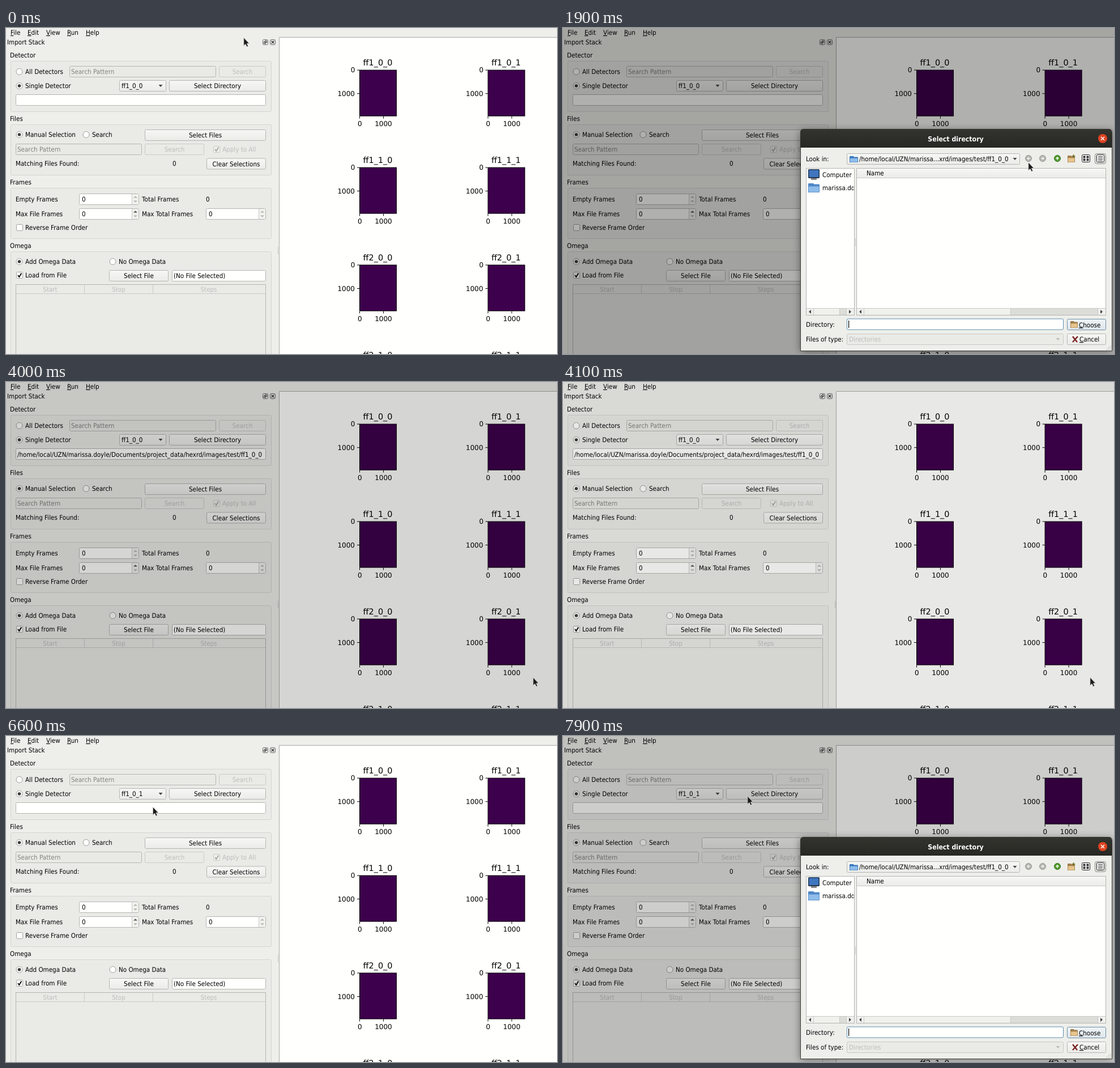
These frames come from a looping animation (973 px wide and 575 px high, 8000 ms). An HTML page:

```html
<!DOCTYPE html>
<html lang="en">
<head>
<meta charset="utf-8">
<title>Import Stack</title>
<style>
html, body { margin: 0; width: 100%; height: 100%; overflow: hidden; background: #eeefeb; }
svg { display: block; }
text { font: 11.55px "DejaVu Sans", sans-serif; text-rendering: geometricPrecision; white-space: pre; }
.mid { text-anchor: middle; }
.off { fill: #bdbebb; }
.hint { fill: #82837f; }
.bold { font-size: 12.2px; font-weight: bold; fill: #fff; }
.tick { font-size: 12px; }
.title { font-size: 14.4px; }
.end { text-anchor: end; }
.shadow { filter: blur(7px); opacity: .45; }
</style>
</head>
<body>
<svg id="stage" width="973" height="575" viewBox="0 0 973 575"></svg>
<script>
const LINE = '#b5b6b2', PALE = '#c9cac6', PAPER = '#fffffd';

// Interface text uses the 90 % wide condensed cut.
const text = (x, y, s, cls = '', more = '') =>
  `<text transform="translate(${x} ${y})scale(.9 1)" class="${cls}" ${more}>${s}</text>`;
const plotText = (x, y, s, cls) => `<text x="${x}" y="${y}" class="${cls}">${s}</text>`;
const box = (x, y, w, h, fill, stroke = LINE, r = 1.5, more = '') =>
  `<rect x="${x + .5}" y="${y + .5}" width="${w - 1}" height="${h - 1}" rx="${r}" fill="${fill}" stroke="${stroke}" ${more}/>`;
const fill = (x, y, w, h, c, more = '') =>
  `<rect x="${x}" y="${y}" width="${w}" height="${h}" fill="${c}" ${more}/>`;
const path = (d, stroke, w = 1, f = 'none') =>
  `<path d="${d}" fill="${f}" stroke="${stroke}" stroke-width="${w}"/>`;
const disc = (x, y, r, f, s = 'none') => `<circle cx="${x}" cy="${y}" r="${r}" fill="${f}" stroke="${s}"/>`;
const key = s => `<tspan text-decoration="underline">${s[0]}</tspan>${s.slice(1)}`;
const arrow = (x, y, dx, dy, c = '#444') => dy
  ? path(`M${x - 3.5} ${y - dy * 2}h7l-3.5 ${dy * 4}z`, 'none', 0, c)
  : path(`M${x - dx * 2} ${y - 3.5}v7l${dx * 4} -3.5z`, 'none', 0, c);

const button = (x, y, w, s, on = true, id = '') =>
  box(x, y, w, 20, on ? 'url(#face)' : '#eaebe7', on ? LINE : PALE, 2, id && `id="${id}"`) +
  text(x + w / 2, y + 14, s, on ? 'mid' : 'mid off');
const field = (x, y, w, s = '', on = true) =>
  box(x, y, w, 20, on ? PAPER : '#e9eae6', LINE, 2) + text(x + 3, y + 14, s, on ? '' : 'hint');
const radio = (x, y, s, on) =>
  disc(x + .5, y, 5.5, PAPER, '#9b9c98') + (on ? disc(x + .5, y, 2.8, '#3c3c3a') : '') + text(x + 11, y + 4, s);
const check = (x, y, s, on, live = true) =>
  box(x, y, 12, 12, live ? PAPER : '#eeefeb', live ? '#a5a6a2' : PALE, 1) +
  (on ? path(`M${x + 3} ${y + 6}l2.3 3 4 -6.5`, live ? '#111' : '#aaaba7', 2) : '') +
  text(x + 16, y + 10, s, live ? '' : 'off');
const spin = (x, y, up) =>
  field(x, y, 106) + text(x + 5, y + 14, '0') +
  fill(x + 93, y + 1, 12, 18, '#f1f2ee') + path(`M${x + 93.5} ${y + 1}v18`, PALE) +
  arrow(x + 99.5, y + 6, 0, -.8, up ? '#444' : '#b0b1ad') + arrow(x + 99.5, y + 14, 0, .8, '#b0b1ad');
const group = (y, h, s) => text(7, y - 6, s) + box(8, y, 461, h, '#eaebe7', '#d4d5d1', 2);
const folder = (x, y, w, h, c, d) =>
  fill(x, y, w * .5, h, d, 'rx="1"') + fill(x, y + 1.5, w, h - 1.5, d, 'rx="1"') +
  fill(x + .8, y + h * .35, w - 1.6, h * .6, c, 'rx="1"');

function panel() {
  const menu = [[8, 'File'], [38, 'Edit'], [71, 'View'], [108, 'Run'], [141, 'Help']];
  return fill(0, 0, 973, 575, '#eeefeb') +
    menu.map(([x, s]) => text(x, 12, key(s))).join('') +
    text(2, 29, 'Import Stack') +
    box(453, 20, 10, 10, 'none', '#666', 2) + box(455, 24, 4, 4, 'none', '#444', 0) + box(457, 22, 4, 4, 'none', '#444', 0) +
    box(466, 20, 10, 10, 'none', '#666', 2) + path('M468.5 22.5l5 5m0 -5l-5 5', '#333', 1.4) +

    group(58, 90, 'Detector') +
    radio(23, 77, 'All Detectors') + field(112, 67, 259, 'Search Pattern', false) + button(376, 67, 83, 'Search', false) +
    radio(23, 102, 'Single Detector', true) +
    box(200, 92, 83, 20, 'url(#face)', LINE, 2) + text(204, 106, '', '', 'id="choice"') + arrow(273, 102, 0, 1) +
    button(288, 92, 171, 'Select Directory', true, 'pick') +
    field(17, 117, 442) + text(20, 131.5, '/home/local/UZN/marissa.doyle/Documents/project_data/hexrd/images/test/ff1_0_0', '', 'id="folder"') +

    group(170, 90, 'Files') +
    radio(23, 188, 'Manual Selection', true) + radio(141, 188, 'Search') + button(245, 179, 214, 'Select Files') +
    field(17, 204, 223, 'Search Pattern', false) + button(245, 204, 105, 'Search', false) +
    check(366, 208, 'Apply to All', true, false) +
    text(17, 243, 'Matching Files Found:') + text(294, 243, '0') + button(354, 229.5, 105, 'Clear Selections') +

    group(282, 90, 'Frames') +
    text(17, 306, 'Empty Frames') + spin(129, 292) + text(240, 306, 'Total Frames') + text(353, 306, '0') +
    text(17, 332, 'Max File Frames') + spin(129, 318, true) + text(240, 332, 'Max Total Frames') + spin(353, 318) +
    check(18, 346, 'Reverse Frame Order') +

    group(394, 200, 'Omega') +
    radio(23, 412, 'Add Omega Data', true) + radio(188, 412, 'No Omega Data') +
    check(18, 430, 'Load from File', true) + button(182, 427, 105, 'Select File') + field(293, 427, 166, '(No File Selected)') +
    box(17, 452, 442, 140, '#eaebe7', LINE, 0) + path('M18 468.5h440M138.5 453v15M259.5 453v15', PALE) +
    text(78, 465, 'Start', 'mid off') + text(199, 465, 'Stop', 'mid off') + text(358, 465, 'Steps', 'mid off') +
    path('M480.5 386v13', '#c6c7c3', 1);
}

function plots() {
  let out = fill(482, 16, 491, 559, PAPER) + path('M482.5 575V16.5H973', '#a9aaa6');
  for (let row = 0; row < 4; row++) for (let col = 0; col < 2; col++) {
    const x = 624 + col * 226.6, y = 73.7 + row * 171.9;
    out += box(x, y, 66, 82, '#3d004c', '#000', 0) +
      path(`M${x} ${y + .5}h-4M${x} ${y + 42}h-4M${x + .5} ${y + 82}v4M${x + 42.5} ${y + 82}v4`, '#000') +
      plotText(x + 32.5, y - 7.7, `ff${1 + (row >> 1)}_${row % 2}_${col}`, 'title mid') +
      plotText(x - 7.5, y + 4.5, '0', 'tick end') + plotText(x - 8, y + 46.3, '1000', 'tick end') +
      plotText(x + .7, y + 99.3, '0', 'tick mid') + plotText(x + 42.5, y + 99.3, '1000', 'tick mid');
  }
  return out;
}

function popup() {
  let out = fill(202, 94, 85, 161, '#000', 'opacity=".12" rx="2"') + box(200, 92, 83, 162, '#f7f8f4', '#a5a6a2', 0) +
    fill(201, 93, 81, 20, '#308cc6', 'id="mark"');
  for (let i = 0; i < 8; i++)
    out += text(221, 107 + i * 20, `ff${1 + (i >> 2)}_${(i >> 1) % 2}_${i % 2}`, 'item');
  return out + path('M206 103l3 3.5 5 -8', '#222', 1.7);
}

const scroller = (x, w, handle) =>
  fill(x, 494, w, 12, '#dcddd9') + fill(x, 494, handle, 12, '#f0f1ed') +
  path(`M${x} 494.5h${w}M${x + 12.5} 495v11M${x + handle + .5} 495v11M${x + w - 13.5} 495v11`, PALE) +
  fill(x + w - 13, 495, 13, 11, '#f0f1ed') + arrow(x + 6, 500.5, -1, 0) + arrow(x + w - 7, 500.5, 1, 0);

function dialog() {
  const blue = '#8fbcea', deep = '#3a78bd', tan = '#e6c48d', brown = '#a07c48';
  let grid = box(916, 223, 15, 14, '#fff', '#222', 2), list = '', grip = '';
  for (let i = 0; i < 4; i++) {
    grid += fill(918.5 + i % 2 * 6, 225.5 + (i >> 1) * 5, 4, 4, '#333');
    list += `M945 ${226.5 + i * 2.5}h8`;
  }
  for (let i = 0; i < 3; i++) for (let j = 0; j <= i; j++)
    grip += fill(966 - j * 3, 560 + i * 3, 1.5, 1.5, '#b5b6b2');
  return fill(419, 181, 551, 390, '#000', 'class="shadow"') +
    path('M419.5 569.5V184q0 -5.5 6 -5.5h538q6 0 6 5.5v385.5z', '#3a3a36', 1, '#eeefeb') +
    path('M419 211V184q0 -6 6 -6h538q6 0 6 6v27z', 'none', 0, 'url(#bar)') +
    text(693.5, 199.5, 'Select directory', 'mid bold') +
    disc(953, 195, 8, '#dc4420') + path('M950 192l6 6m0 -6l-6 6', '#fff', 1.5) +

    text(429, 235, 'Look in:') + box(501, 221, 306, 20, 'url(#face)', LINE, 2) + folder(506, 226, 15, 11, blue, deep) +
    text(523, 235, '/home/local/UZN/marissa…xrd/images/test/ff1_0_0') + arrow(798, 231, 0, 1) +
    disc(822, 230, 5.5, '#b3b4b0', '#989995') + path('M825 230h-5m2.5 -2.5l-2.5 2.5 2.5 2.5', '#f2f2f0', 1.4) +
    disc(847, 230, 5.5, '#b3b4b0', '#989995') + path('M844 230h5m-2.5 -2.5l2.5 2.5 -2.5 2.5', '#f2f2f0', 1.4) +
    disc(873, 230, 5.5, '#4f9a2c', '#356f1c') + path('M873 233v-5m-2.5 2.5l2.5 -2.5 2.5 2.5', '#fff', 1.4) +
    folder(891, 225, 13, 12, tan, brown) + path('M901.5 223v6m-3 -3h6', '#6b6a20', 1.4) +
    grid + box(939, 221, 20, 19, '#dcddd9', '#8f908c', 3) + box(942, 223, 14, 14, '#fff', '#222', 2) + path(list, '#333', 1) +

    box(429, 247, 86, 260, PAPER, LINE, 0) + fill(433, 249, 20, 16, '#26384f', 'rx="1.5"') +
    fill(434.5, 250.5, 17, 12.5, '#3f76bf') + fill(438, 265, 10, 3, '#888') + folder(433, 274, 20, 16, blue, '#5088c8') +
    `<svg x="430" y="248" width="83.5" height="245" viewBox="430 248 83.5 245">${text(458, 263, 'Computer')}${text(458, 286, 'marissa.doyle')}</svg>` +
    scroller(430, 84, 58) +
    box(518, 247, 441, 260, PAPER, LINE, 0) + fill(519, 248, 439, 16, 'url(#face)') + path('M519 264.5h439', PALE) +
    text(536, 260, 'Name') + scroller(519, 439, 271) + path('M516.5 371v14', '#c6c7c3') +

    text(429, 527, 'Directory:') + box(501, 512.5, 383, 20, PAPER, '#5f8fb4', 2) + fill(504, 516, 1.2, 13, '#000', 'id="caret"') +
    text(429, 553, 'Files of type:') + box(501, 539, 383, 20, '#eaebe7', PALE, 2) + text(505, 553, 'Directories', 'off') +
    arrow(874, 549, 0, 1, '#bdbebb') +
    box(890, 513, 69, 20, 'url(#default)', '#6f8ea8', 2) + folder(896, 517, 13, 12, tan, brown) + text(911, 527.5, key('Choose')) +
    box(890, 539, 69, 20, 'url(#face)', LINE, 2) + path('M900 544l8 10m1 -10l-9 10', '#7a2222', 2.4) + text(912, 553, key('Cancel')) +
    grip;
}

const gradient = (id, a, b) =>
  `<linearGradient id="${id}" x2="0" y2="1"><stop stop-color="${a}"/><stop offset="1" stop-color="${b}"/></linearGradient>`;
stage.innerHTML = `<defs>${gradient('face', '#f7f8f5', '#ebece8')}${gradient('default', '#eef3f6', '#dfe7ec')}${gradient('bar', '#34342f', '#272723')}</defs>` +
  panel() + plots() + `<g id="menu">${popup()}</g>` + fill(0, 0, 973, 575, '#000', 'id="shade"') +
  `<g id="chooser">${dialog()}</g><g id="pointer">${path('M.8 1V15.4L4 12.4 6.3 17.2 8.7 16.2 6.5 11.4H10.6z', '#e8e8e6', .8, '#1c1c1c')}</g>`;

const $ = id => document.getElementById(id);
const items = [...document.querySelectorAll('.item')];
const show = (id, on) => $(id).setAttribute('visibility', on ? 'visible' : 'hidden');

const moves = [
  [0, 419, 16], [100, 413, 58], [200, 407, 89], [300, 407, 89], [400, 409, 100], [1300, 409, 100],
  [1900, 821, 236], [2200, 786, 222], [2900, 904, 354], [3000, 904, 354], [3200, 948, 480], [3400, 931.5, 531],
  [3500, 931.5, 531], [3700, 930, 520], [4200, 930, 520], [4700, 212, 125], [5000, 250, 98], [5100, 253.5, 103],
  [5500, 253.5, 103], [5900, 258.5, 124], [6800, 258.5, 124], [6900, 403, 98], [7000, 325, 105]
];
const shades = [[700, 0], [1100, .215], [1200, .31], [3800, .31], [4100, .09], [4200, 0], [7500, 0], [7900, .195]];

function at(keys, t) {
  const i = keys.findIndex(k => k[0] > t);
  if (i < 0) return keys[keys.length - 1].slice(1);
  if (!i) return keys[0].slice(1);
  const a = keys[i - 1], b = keys[i], p = (t - a[0]) / (b[0] - a[0]);
  return a.slice(1).map((v, n) => v + (b[n + 1] - v) * p);
}

function draw(now) {
  const t = Math.floor(now % 8000 / 100) * 100;   // ten pictures a second
  const within = (a, b) => t >= a && t < b;
  const [x, y] = at(moves, t);
  const open = within(800, 3900) || t >= 7600;
  const row = y < 113 ? 0 : 1;

  $('pointer').setAttribute('transform', `translate(${x} ${y})`);
  $('shade').setAttribute('opacity', at(shades, t)[0]);
  show('chooser', open);
  show('caret', open && (t >= 7600 || Math.floor((t - 700) / 500) % 2 === 0));
  show('folder', within(3900, 6600));
  $('choice').textContent = t < 6600 ? 'ff1_0_0' : 'ff1_0_1';
  $('pick').setAttribute('fill', within(500, 700) || within(7300, 7500) ? '#dcddd9' : 'url(#face)');
  show('menu', within(5300, 6600));
  $('mark').setAttribute('y', 93 + row * 20);
  items.forEach((el, i) => el.setAttribute('fill', i === row ? '#fff' : '#000'));
  requestAnimationFrame(() => draw(performance.now()));
}
draw(0);
</script>
</body>
</html>
```
